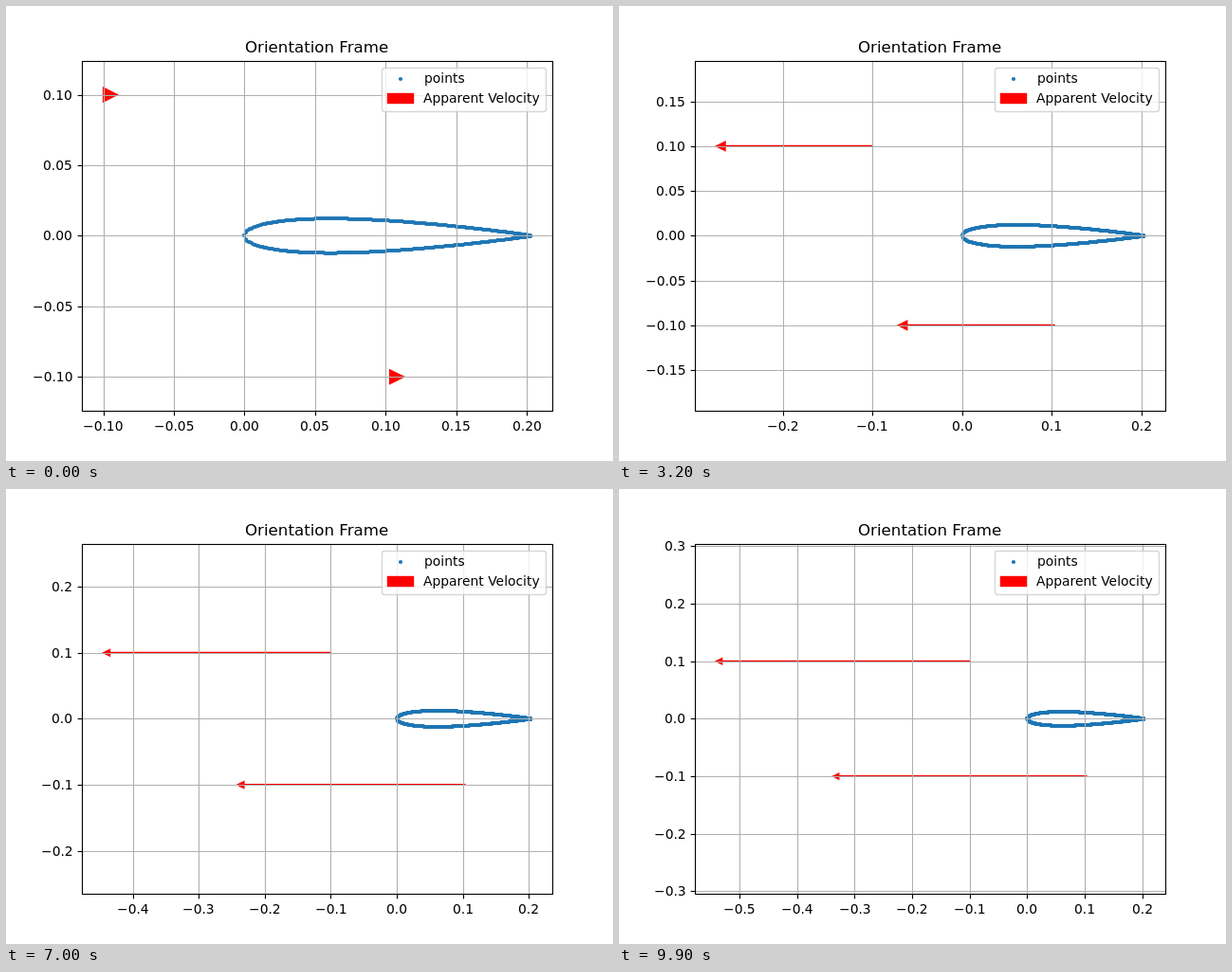
Write an HTML page with a canvas that moves like this. It is 640x480 px and loops after 10000 ms.

```html
<!DOCTYPE html>
<html lang="en">
<head>
<meta charset="utf-8">
<title>Orientation Frame</title>
<style>
  html, body { margin: 0; width: 100%; height: 100%; overflow: hidden; background: #fff; }
  canvas { display: block; }
</style>
</head>
<body>
<canvas id="stage" width="640" height="480"></canvas>
<script>
const ctx = document.getElementById("stage").getContext("2d");

const STEP_MS = 100, STEPS = 100;
const PT = 100 / 72;
const BOX = { l: 80, t: 57.6, r: 576, b: 427.2 };
const W = BOX.r - BOX.l, H = BOX.b - BOX.t;
const MID_Y = (BOX.t + BOX.b) / 2;
const PAD = W / 22;                 // 5 % margin on each side of the data
const CHORD = 0.203, THICK = 0.12, DOTS = 203;
const HEAD = 0.01, SHAFT = 0.001;
const RED = "#ff0000", BLUE = "#1f77b4", GRID = "#b0b0b0", DIM = "#555";
const FONT = '"DejaVu Sans", sans-serif';

const snap = v => Math.floor(v + 0.5) + 0.5;

function line(x1, y1, x2, y2, color) {
  ctx.strokeStyle = color;
  ctx.lineWidth = 0.8 * PT;
  ctx.beginPath();
  ctx.moveTo(x1, y1);
  ctx.lineTo(x2, y2);
  ctx.stroke();
}

function text(str, x, y, align, pt = 10) {
  ctx.font = pt * PT + "px " + FONT;
  ctx.fillStyle = "#000";
  const w = ctx.measureText(str).width;
  const shift = { left: 0, center: w / 2, right: w }[align];
  ctx.fillText(str, Math.round(x - shift), y);
}

function dot(x, y) {
  ctx.beginPath();
  ctx.arc(x, y, 2.1, 0, 2 * Math.PI);
  ctx.fill();
}

// Symmetric four-digit section: half thickness at fraction u of the chord
function halfThickness(u) {
  return 5 * THICK * CHORD * (0.2969 * Math.sqrt(u) - 0.126 * u
    - 0.3516 * u ** 2 + 0.2843 * u ** 3 - 0.1015 * u ** 4);
}

// Tick values for a visible range, at most nine intervals
function ticks(lo, hi) {
  const step = (hi - lo) / 9 > 0.05 ? 0.1 : 0.05;
  const list = [];
  for (let i = Math.ceil(lo / step); i * step <= hi; i++) {
    const label = Math.abs(i * step).toFixed(step < 0.1 ? 2 : 1);
    list.push({ v: i * step, label: (i < 0 ? "\u2212" : "") + label });
  }
  return list;
}

function drawArrow(view, bx, by, len) {
  const dir = len > 0 ? -1 : 1;
  const k = view.scale;
  const x0 = view.x(bx), y = view.y(by);
  const neck = x0 + dir * len * k;
  const tip = neck + dir * HEAD * k;
  const hs = SHAFT * k / 2, hh = HEAD * k / 2;

  ctx.fillStyle = ctx.strokeStyle = RED;
  ctx.lineWidth = PT;
  ctx.beginPath();
  ctx.moveTo(tip, y);
  ctx.lineTo(neck, y - hh);
  ctx.lineTo(neck, y - hs);
  ctx.lineTo(x0, y - hs);
  ctx.lineTo(x0, y + hs);
  ctx.lineTo(neck, y + hs);
  ctx.lineTo(neck, y + hh);
  ctx.closePath();
  ctx.fill();
  ctx.stroke();

  // A shaft that barely shows beside its grid line turns grey
  const row = Math.floor(y + 0.5) - 1;
  if (len > 0 && row + 1 - (y - hs - PT / 2) < 0.9) {
    ctx.fillStyle = DIM;
    ctx.fillRect(neck, row, x0 - neck, 1);
  }
}

function drawFoil(view) {
  ctx.fillStyle = BLUE;
  for (let i = 0; i <= DOTS; i++) {
    const u = i / DOTS, h = halfThickness(u);
    const x = Math.round(view.x(u * CHORD));
    dot(x, Math.round(view.y(h)));
    dot(x, Math.round(view.y(-h)));
  }
}

function drawAxes(view) {
  const top = snap(BOX.t), bottom = snap(BOX.b);
  const left = snap(BOX.l), right = snap(BOX.r);
  const xs = ticks(view.lo, view.hi);
  const ys = ticks(-view.half, view.half);
  const len = 3.5 * PT;

  for (const { v } of xs) line(snap(view.x(v)), top, snap(view.x(v)), bottom, GRID);
  for (const { v } of ys) line(left, snap(view.y(v)), right, snap(view.y(v)), GRID);

  for (const { v, label } of xs) {
    const x = snap(view.x(v));
    line(x, bottom, x, bottom + len, "#000");
    text(label, view.x(v), 448, "center");
  }
  for (const { v, label } of ys) {
    const y = snap(view.y(v));
    line(left - len, y, left, y, "#000");
    text(label, BOX.l - 2 * len, Math.round(view.y(v) + 5), "right");
  }

  ctx.strokeStyle = "#000";
  ctx.lineWidth = 0.8 * PT;
  ctx.strokeRect(left, top, right - left, bottom - top);
}

function drawLegend() {
  ctx.beginPath();
  ctx.roundRect(396.5, 65.5, 173, 46, 2.8);
  ctx.fillStyle = "rgba(255,255,255,0.8)";
  ctx.fill();
  ctx.strokeStyle = "rgba(204,204,204,0.8)";
  ctx.lineWidth = PT;
  ctx.stroke();

  ctx.fillStyle = BLUE;
  dot(416, 77);
  ctx.fillStyle = RED;
  ctx.fillRect(401.8, 91.8, 28.4, 11.4);
  text("points", 441, 81, "left");
  text("Apparent Velocity", 440, 102, "left");
}

function draw(step) {
  const len = 0.5 * Math.sin(step * Math.PI / 300);
  const min = -0.1 - (len > 0 ? len + HEAD : 0);
  const scale = (W - 2 * PAD) / (CHORD - min);
  const view = {
    scale,
    lo: min - PAD / scale,
    hi: CHORD + PAD / scale,
    half: H / 2 / scale,
    x: v => BOX.l + PAD + (v - min) * scale,
    y: v => MID_Y - v * scale
  };

  ctx.fillStyle = "#fff";
  ctx.fillRect(0, 0, 640, 480);
  drawFoil(view);
  drawArrow(view, -0.1, 0.1, len);
  drawArrow(view, CHORD - 0.1, -0.1, len);
  drawAxes(view);
  text("Orientation Frame", 328, 49, "center", 12);
  drawLegend();
}

const start = performance.now();
function tick() {
  const t = Math.max(0, performance.now() - start);
  draw(Math.floor(t / STEP_MS) % STEPS);
  requestAnimationFrame(tick);
}
tick();
</script>
</body>
</html>
```
